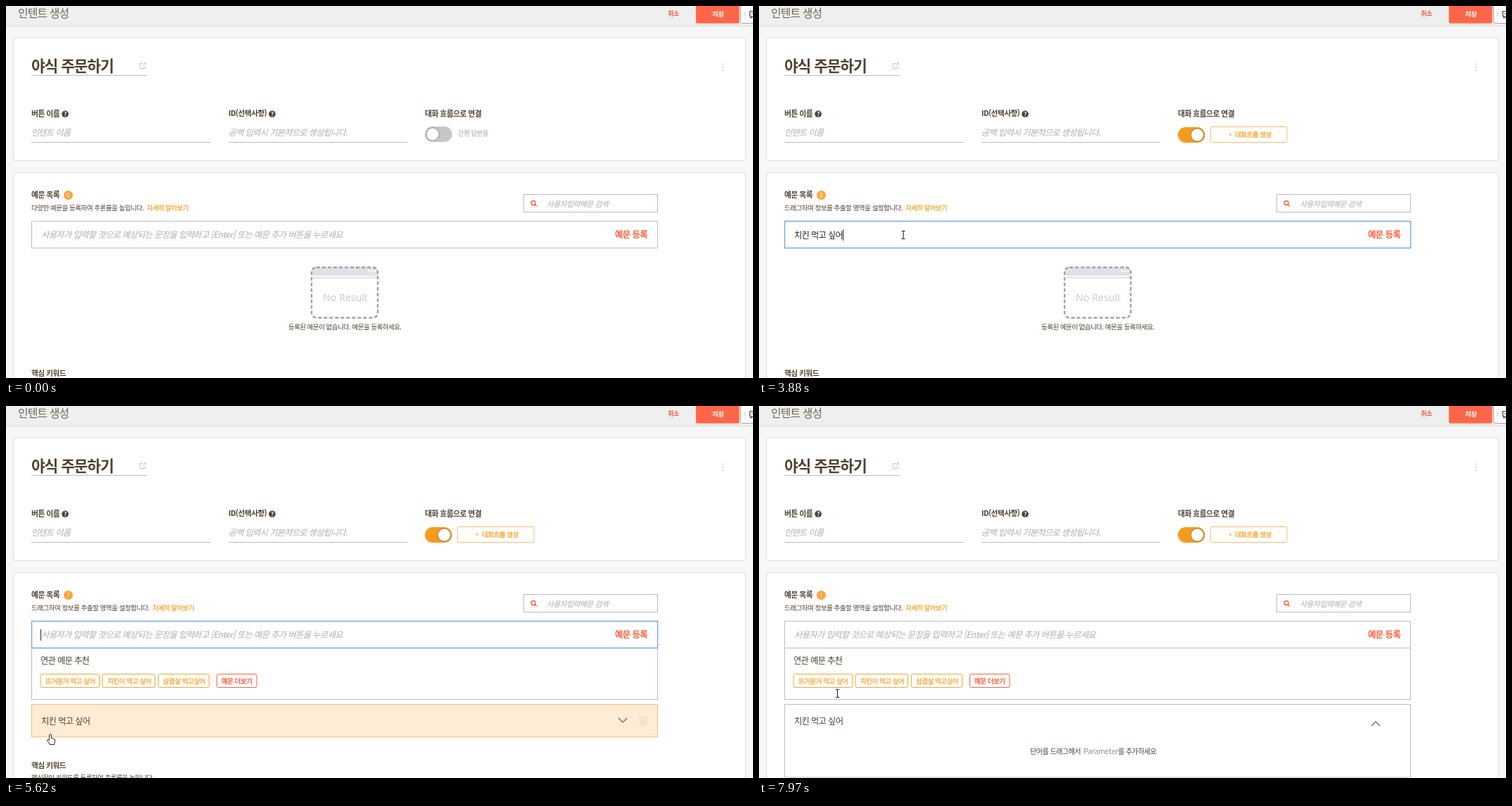
An HTML page that plays this animation: 1061x528 px, repeating every 7.99 s.

```html
<!DOCTYPE html>
<html lang="ko">
<head>
<meta charset="utf-8">
<title>인텐트 생성</title>
<style>
  html, body { margin: 0; width: 100%; height: 100%; overflow: hidden; background: #f7f7f7; }
  svg { display: block; }
  text { font-family: "Noto Sans CJK KR", "Noto Sans CJK", sans-serif; letter-spacing: -.05em; white-space: pre; }
  text.latin { font-family: Lato, sans-serif; letter-spacing: 0; }
  text.round { font-family: "Open Sans", sans-serif; letter-spacing: 0; }
  text.medium { stroke: currentColor; stroke-width: .3px; }
  .hide { display: none; }
</style>
</head>
<body>
<svg id="stage" width="1061" height="528" viewBox="0 0 1061 528"></svg>
<script>
const LOOP = 7990;
const BROWN = '#4f4030', GREY = '#adadb1', LINE = '#bdbdbd', ORANGE = '#f9a531', RED = '#ff5f3c';

// Text placed by its left edge and the vertical centre of its letters.
function label(x, y, str, size, fill = BROWN, o = {}) {
  return `<text x="${x}" y="${(y + size * .37).toFixed(2)}" font-size="${size}" fill="${fill}" color="${fill}"
    font-weight="${o.w || 400}" ${o.i ? 'font-style="italic"' : ''} ${o.c ? `class="${o.c}"` : ''}
    ${o.mid ? 'text-anchor="middle"' : ''} ${o.id ? `id="${o.id}"` : ''}>${str}</text>`;
}
function box(l, t, r, b, fill, stroke = 'none', rx = 0, extra = '') {
  const p = stroke === 'none' ? 0 : .5;
  return `<rect x="${l + p}" y="${t + p}" width="${r - l - 2 * p}" height="${b - t - 2 * p}" rx="${rx}" fill="${fill}" stroke="${stroke}" ${extra}/>`;
}
const path = (d, stroke, width = 1, extra = '') =>
  `<path d="${d}" fill="none" stroke="${stroke}" stroke-width="${width}" ${extra}/>`;
const dot = (x, y, r, fill, extra = '') => `<circle cx="${x}" cy="${y}" r="${r}" fill="${fill}" ${extra}/>`;
const group = (id, body, extra = '') => `<g id="${id}" ${extra}>${body}</g>`;
const help = x => dot(x, 153.3, 4.8, BROWN) + label(x, 153.4, '?', 8.5, '#fff', { w: 700, mid: 1 });
const chip = (l, r, x, str, color, o) => box(l, 380, r, 400, '#fff', color, 2) + label(x, 390, str, 9.5, color, o);

const header =
  box(0, 0, 1061, 28, '#efefef') + path('M0 28.5H1061', '#dedede') +
  label(17, 10.5, '인텐트 생성', 15.8, '#6f6356', { w: 300 }) +
  label(940, 11, '취소', 9.2, RED, { w: 700 }) +
  box(980, -4, 1041.5, 24.5, '#ff6646', 'none', 2, 'filter="url(#soft)"') +
  label(1003, 11, '저장', 9.5, '#fff', { w: 700 }) +
  box(1043, -6, 1075, 25, '#fff', '#a8a8a8', 3) +
  path('M1050.5 9l-2.5 2.5 2.5 2.5', ORANGE, 1) +
  path('M1064 7.5H1056.5V14.5H1058V17L1061 14.5', '#444', 1.2) + dot(1059.5, 11, .8, '#444');

const info =
  box(10, 44, 1051, 220, '#fff', '#dcdcdc', 3) +
  label(36, 85, '야식 주문하기', 21.4, BROWN, { w: 700 }) +
  path('M36 98.5H200', LINE) +
  path('M194.5 81.5H190.5V88.5H197.5V85M193.5 85.5L198 81M195.5 80.8H198.2V83.5', '#c6c6c6') +
  [82.5, 87, 91.5].map(y => dot(1018, y, 1.2, '#dedede')).join('') +
  label(36, 152.5, '버튼 이름', 10.8, BROWN, { w: 700 }) + help(84) +
  label(36, 180, '인텐트 이름', 12.1, GREY, { i: 1, w: 350 }) + path('M36 193.5H291', LINE) +
  label(316, 152.5, 'ID(선택사항)', 10.7, BROWN, { w: 700 }) + help(378) +
  label(316, 180, '공백 입력시 기본적으로 생성됩니다.', 12.1, GREY, { i: 1, w: 350 }) + path('M316 193.5H570', LINE) +
  label(595, 152.5, '대화 흐름으로 연결', 10.8, BROWN, { w: 700 }) +
  group('toggle', box(595, 171, 633.5, 193, '#c6c6c6', 'none', 11, 'id="track"') +
    dot(606, 182, 9, '#fff', 'id="knob" stroke="#000" stroke-opacity=".18" stroke-width="2"')) +
  group('simple', label(642, 181, '간편 답변중', 9.4, '#c0c0c0', { c: 'medium' })) +
  group('flow', box(641, 171, 750.5, 194, '#fff', '#fabd6c', 2) +
    label(666.5, 182.5, '+', 10, ORANGE) + label(676, 182.5, '대화흐름 생성', 9.5, ORANGE, { c: 'medium' }));

const examples =
  box(10, 236, 1051, 560, '#fff', '#dcdcdc', 3) +
  label(36, 267.5, '예문 목록', 10.8, BROWN, { w: 700 }) +
  dot(88.5, 268.5, 6.5, '#ffa437') + label(88.5, 268.7, '0', 8.5, '#fff', { mid: 1, id: 'count', c: 'round' }) +
  label(36, 286.8, '', 9.5, BROWN, { id: 'hint' }) +
  label(200, 286.8, '자세히 알아보기', 9.35, ORANGE, { c: 'medium', id: 'more' }) +
  box(735, 267, 926, 293, '#fff', LINE) +
  path('M751.2 281.8L753.6 284.2', RED, 1.8) + `<circle cx="749" cy="279.5" r="2.9" fill="none" stroke="${RED}" stroke-width="1.5"/>` +
  label(768, 280.5, '사용자입력예문 검색', 10.8, GREY, { i: 1, w: 350 });

const empty = group('empty',
  box(434, 371, 528, 383, '#dfe3e7', 'none', 4) +
  path('M436 385.5H527', '#d3d7db', 1.5) +
  [515, 519.5, 524].map(x => dot(x, 376, 1.5, '#fff')).join('') +
  `<rect x="434" y="371" width="94" height="71.5" rx="7" fill="none" stroke="#9aa3b1" stroke-width="2.4" stroke-dasharray="5 3"/>` +
  label(450, 414, 'No Result', 14.2, '#c6cacd', { c: 'round' }) +
  label(401, 455.5, '등록된 예문이 없습니다. 예문을 등록하세요.', 9.43));

const tips = group('tips',
  box(36, 343, 926, 417, '#fff', LINE) +
  label(49, 361.5, '연관 예문 추천', 12.2) +
  chip(48.5, 133, 56, '뜨거운거 먹고 싶어', ORANGE, { c: 'medium' }) +
  chip(136.5, 212, 144, '치킨이 먹고 싶어', ORANGE, { c: 'medium' }) +
  chip(216, 289, 223, '삼겹살 먹고싶어', ORANGE, { c: 'medium' }) +
  chip(299, 356.5, 306, '예문 더보기', RED, { w: 700 }));

const item = group('item',
  box(36, 423, 926, 470, '#fff', LINE, 0, 'id="frame"') +
  box(50, 440, 70, 455, '#3b8de9', 'none', 0, 'id="mark"') +
  label(50, 447.5, '<tspan id="word">치킨</tspan> 먹고 싶어', 12.2) +
  group('closed', path('M870 443L876 449L882 443', '#777', 1.5) +
    path('M898.5 442.5H910.5M902.5 442V440.5H906.5V442M900 443L900.7 453H908.3L909 443M902.7 445V451M904.5 445V451M906.3 445V451', '#f8cfc5')) +
  group('opened', path('M870 454L876 448L882 454', '#777', 1.5) +
    label(385, 490, '단어를 드래그해서', 10) +
    label(461, 490, 'Parameter', 11.3, BROWN, { c: 'latin', w: 300 }) +
    label(510, 490, '를 추가하세요', 9.95)));

const input =
  box(36, 305, 926, 344, '#fff', LINE, 0, 'id="field"') +
  label(50, 324.5, '사용자가 입력할 것으로 예상되는 문장을 입력하고 [Enter] 또는 예문 추가 버튼을 누르세요', 12.25, GREY, { i: 1, w: 350, id: 'ghost' }) +
  label(50, 325, '', 12.2, '#222', { id: 'typed' }) +
  box(49, 317, 50, 333, '#222', 'none', 0, 'id="caret"') +
  label(865, 324, '예문 등록', 12.4, RED, { w: 700 });

const keywords = group('keywords',
  label(36, 0, '핵심 키워드', 10.7, BROWN, { w: 700 }) +
  label(36, 17, '핵심적인 키워드를 등록하여 추론률을 높입니다.', 9.4));

const rows = ['any', 'confirm', 'date', 'month', 'number'];
const rowTop = i => 297.5 + i * 25.4;
const popup = group('popup',
  box(69, 272, 259, 479, '#fff', 'none', 0, 'filter="url(#shade)"') +
  box(69, 272, 259, 300, '#fafafa') +
  label(73, 285.5, 'filter...', 9, '#999', { c: 'latin', i: 1, w: 300 }) +
  `<rect id="hover" x="69" width="182" height="25.4" fill="#f9ab5b"/>` +
  rows.map((r, i) => label(81, rowTop(i) + 12.6, 'sys.' + r, 9.5, '#666', { c: 'latin', id: 'row' + i })).join('') +
  box(251, 300, 259, 428, '#f1f1f1') + box(251, 300, 259, 379, '#c4c4c4') +
  box(69, 428, 259, 479, '#fafafa') + path('M69 427.5H259M69 453.5H259', '#e6e6e6') +
  path('M125 440H132M128.5 436.5V443.5', BROWN, 2) +
  label(135, 440, '새로운 Entity 생성', 9.4) +
  box(235, 460, 256, 474, '#fff', '#ececec', 2) + label(238, 467, '닫기', 8.2, BROWN, { c: 'medium' }));

const pointers =
  dot(0, 0, 9.7, '#ffe600', 'id="press" opacity=".72"') +
  group('arrow', '<path d="M0 0V11L2.6 8.6L4.4 12.4L6 11.7L4.3 8H7.8Z" fill="#fff" stroke="#222" stroke-width="1"/>') +
  group('beam', path('M-2.5 -5.5H-.6L0 -5L.6 -5.5H2.5M0 -5V5M-2.5 5.5H-.6L0 5L.6 5.5H2.5', '#222', 1.1)) +
  group('hand', '<path d="M-.4 .6Q1 -1.2 2.4 .6V5.6L6 6.4Q8 7 7.6 9.2L6.6 14.6H.4L-3.2 9Q-3.4 7 -1.6 7.6L-.4 8.6Z" fill="#fff" stroke="#222" stroke-width="1"/>');

document.getElementById('stage').innerHTML = `<defs>
  <filter id="soft" x="-20%" y="-40%" width="140%" height="180%"><feDropShadow dx="0" dy="1" stdDeviation="1.5" flood-opacity=".13"/></filter>
  <filter id="shade" x="-30%" y="-30%" width="160%" height="160%"><feDropShadow dx="4" dy="3" stdDeviation="9" flood-opacity=".2"/></filter>
  </defs>` + header + info + examples + empty + tips + item + input + keywords + popup + pointers;

const $ = Object.fromEntries([...document.querySelectorAll('[id]')].map(e => [e.id, e]));
const show = (e, on) => e.classList.toggle('hide', !on);
const set = (e, attrs) => { for (const k in attrs) e.setAttribute(k, attrs[k]); };
const within = (t, a, b) => t >= a && t < b;

// The screen refreshes every 100 ms, and the beat restarts at these times.
const beats = [10, 1650, 2490, 2510, 3350, 3880, 5320, 6240, 6670, 6720, 7960, 7970];
function tick(t) {
  const from = beats.filter(b => b <= t).pop();
  return from === undefined ? 0 : from + Math.floor((t - from) / 100) * 100;
}

const trail = [
  [110, 395, 484], [810, 555, 254], [1310, 616, 182], [1750, 616, 182], [2450, 205, 325],
  [4700, 205, 325], [5320, 127, 371], [5620, 62, 466], [5920, 56, 452], [6140, 54.5, 447],
  [6240, 54.5, 447], [6440, 50, 448], [6640, 75, 453], [6720, 75, 453], [7020, 106, 312],
  [7220, 119, 391.5], [7420, 113, 410], [7620, 111.5, 408]
];
function mouse(t) {
  const n = trail.findIndex(p => p[0] > t);
  if (n <= 0) return trail[n < 0 ? trail.length - 1 : 0].slice(1);
  const [a, b] = [trail[n - 1], trail[n]];
  const k = (t - a[0]) / (b[0] - a[0]), e = k * k * (3 - 2 * k);
  return [a[1] + (b[1] - a[1]) * e, a[2] + (b[2] - a[2]) * e];
}
const shapes = [[110, 'arrow'], [1210, 'hand'], [1850, 'arrow'], [2350, 'beam'], [4880, 'arrow'], [5520, 'hand'], [6340, 'beam']];
const presses = [[1550, 1750], [2510, 2610], [6240, 6340], [6440, 6720]];

// Each key press of the Korean input method.
const keys = 'ㅊ|치|칰|치키|치킨|치킨 |치킨 ㅁ|치킨 머|치킨 먹|치킨 먹ㄱ|치킨 먹고|치킨 먹고 |치킨 먹고 ㅅ|치킨 먹고 시|치킨 먹고 싶|치킨 먹고 싶어'.split('|');
const FOCUS = 2510, TYPE = 2700, KEY = 70, ENTER = 4180, TIPS = 4380, BLUR = 6240, OPEN = 6340, POPUP = 6670, CLOSE = 7920;

function draw(now) {
  const t = tick(now), [x, y] = mouse(t);

  const on = t >= 1610, slide = Math.min(1, Math.max(0, (t - 1560) / 150));
  set($.track, { fill: on ? '#f39c20' : '#c6c6c6' });
  set($.knob, { cx: 606 + 16.5 * slide });
  set($.toggle, { transform: `translate(0 ${on ? 1 : 0})` });
  show($.simple, !on);
  show($.flow, on);
  $.hint.textContent = on ? '드래그하여 정보를 추출할 영역을 설정합니다.' : '다양한 예문을 등록하여 추론률을 높입니다.';
  set($.more, { x: on ? 208 : 200 });

  const focus = within(t, FOCUS, BLUR);
  const pressed = Math.min(keys.length, Math.floor((t - TYPE) / KEY) + 1);
  const text = pressed > 0 && t < ENTER ? keys[pressed - 1] : '';
  const lastKey = t >= ENTER ? ENTER : pressed > 0 ? TYPE + (pressed - 1) * KEY : FOCUS;
  set($.field, { stroke: focus ? '#7ba6ea' : LINE, 'stroke-width': focus ? 1.5 : 1 });
  $.typed.textContent = text;
  show($.ghost, !text);
  show($.caret, focus && (t - lastKey) % 1000 < 500);
  set($.caret, { x: text ? 50 + $.typed.getComputedTextLength() : 49 });

  const added = t >= ENTER, tipped = t >= TIPS, open = t >= OPEN;
  $.count.textContent = added ? 1 : 0;
  show($.empty, !added);
  show($.tips, tipped);
  show($.item, added);
  set($.item, { transform: `translate(0 ${tipped ? 0 : -73})` });
  const hot = within(t, 5520, OPEN);
  set($.frame, { height: open ? 103.5 : 46.3, fill: hot ? '#ffecd4' : '#fff', stroke: hot ? '#efc080' : LINE });
  show($.closed, !open);
  show($.opened, open);
  set($.keywords, { transform: `translate(0 ${!added ? 521.5 : !tipped ? 437.5 : open ? 568 : 510.5})` });

  const marked = within(t, 6540, CLOSE);
  show($.mark, marked);
  set($.mark, { width: Math.max(0, Math.min(21, x - 50)) });
  set($.word, { fill: marked ? '#fff' : BROWN });

  show($.popup, within(t, POPUP, CLOSE));
  const row = Math.floor((y - rowTop(0)) / 25.4);
  const hit = row >= 0 && row < rows.length;
  show($.hover, hit);
  if (hit) set($.hover, { y: rowTop(row) });
  rows.forEach((r, i) => set($['row' + i], { fill: i === row ? '#fff' : '#666' }));

  const shape = (shapes.filter(s => s[0] <= t).pop() || [])[1];
  for (const s of ['arrow', 'beam', 'hand']) {
    show($[s], s === shape);
    set($[s], { transform: `translate(${x.toFixed(1)} ${y.toFixed(1)})` });
  }
  show($.press, presses.some(([a, b]) => within(t, a, b)));
  set($.press, { cx: x, cy: y });
}

const start = performance.now();
function frame() {
  draw((performance.now() - start) % LOOP);
  requestAnimationFrame(frame);
}
frame();
</script>
</body>
</html>
```
